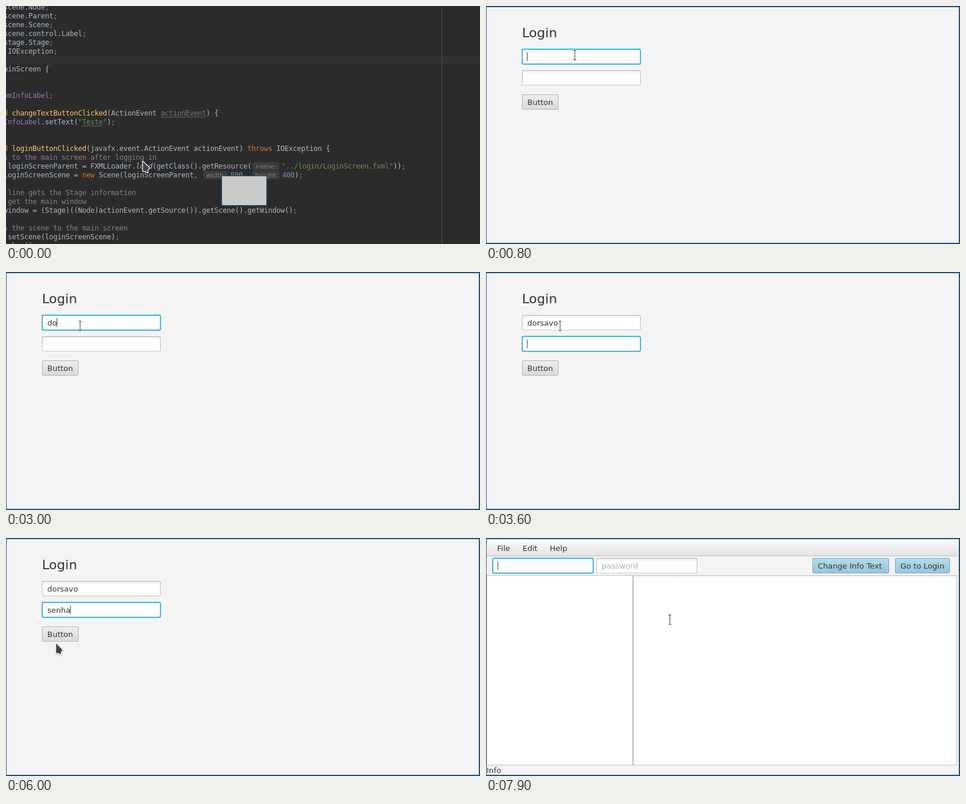
Animation, 803 px wide and 404 px high, one loop 8 s. Source, as an HTML page with a canvas:

```html
<!DOCTYPE html>
<html lang="en">
<head>
<meta charset="utf-8">
<title>Login flow</title>
<style>
html, body { margin: 0; width: 100%; height: 100%; overflow: hidden; background: #f4f4f4; }
canvas { display: block; }
</style>
</head>
<body>
<canvas id="stage" width="803" height="404"></canvas>
<script>
const ctx = document.getElementById('stage').getContext('2d');
const W = 803, H = 404, LOOP = 8000;
const SANS = '"DejaVu Sans", Verdana, sans-serif';
const MONO = '"DejaVu Sans Mono", monospace';
const USER = 'dorsavo', PASS = 'senha';

// ---------- helpers ----------
function rect(x, y, w, h, fill) {
  ctx.fillStyle = fill;
  ctx.fillRect(x, y, w, h);
}

function round(x, y, w, h, r, fill) {
  ctx.fillStyle = fill;
  ctx.beginPath();
  ctx.roundRect(x, y, w, h, r);
  ctx.fill();
}

function text(s, x, y, size = 13, color = '#333') {
  ctx.font = `${size}px ${SANS}`;
  ctx.fillStyle = color;
  ctx.fillText(s, x, y);
}

function fade(y0, y1, ...colors) {
  const g = ctx.createLinearGradient(0, y0, 0, y1);
  colors.forEach((c, i) => g.addColorStop(i / (colors.length - 1), c));
  return g;
}

// Last entry of a [time, ...] list that has begun.
function at(list, t) {
  let hit = list[0];
  for (const e of list) if (e[0] <= t) hit = e;
  return hit;
}

// ---------- code editor ----------
const INK = {
  t: '#a9b7c6', k: '#cc7832', s: '#6a8759', n: '#6897bb',
  m: '#ffc66d', f: '#9876aa', c: '#808080', u: '#72737a', i: '#a9b7c6'
};
const CELL = 7;
// [row, x, ...[ink, text, hint width]]
const ROWS = [
  [0, -4, ['t', 'scene.Node'], ['k', ';']],
  [1, -4, ['t', 'scene.Parent'], ['k', ';']],
  [2, -4, ['t', 'scene.Scene'], ['k', ';']],
  [3, -4, ['t', 'scene.control.Label'], ['k', ';']],
  [4, -4, ['t', 'stage.Stage'], ['k', ';']],
  [5, -4, ['t', '.IOException'], ['k', ';']],
  [7, -4, ['t', 'ainScreen {']],
  [10, -4, ['f', 'omInfoLabel'], ['k', ';']],
  [12, -4, ['k', 'd '], ['m', 'changeTextButtonClicked'], ['t', '(ActionEvent '], ['u', 'actionEvent'], ['t', ') {']],
  [13, -4, ['f', 'InfoLabel'], ['t', '.setText('], ['s', '"Teste"'], ['t', ')'], ['k', ';']],
  [16, -4, ['k', 'd '], ['m', 'loginButtonClicked'], ['t', '(javafx.event.ActionEvent actionEvent) '],
    ['k', 'throws '], ['t', 'IOException {']],
  [17, -4, ['c', 's to the main screen after logging in']],
  [18, 3, ['t', 'loginScreenParent = FXMLLoader.'], ['i', 'load'], ['t', '(getClass().getResource('],
    ['h', 'name:', 51], ['s', '"../login/LoginScreen.fxml"'], ['t', '))'], ['k', ';']],
  [19, -4, ['t', 'loginScreenScene = '], ['k', 'new '], ['t', 'Scene(loginScreenParent'], ['k', ', '],
    ['h', 'width:', 48], ['n', '800'], ['k', ', '], ['h', 'height:', 53], ['n', '400'], ['t', ')'], ['k', ';']],
  [21, 3, ['c', 'line gets the Stage information']],
  [22, 3, ['c', 'get the main window']],
  [23, -4, ['t', 'window = (Stage)((Node)actionEvent.getSource()).getScene().getWindow()'], ['k', ';']],
  [25, -4, ['c', 's the scene to the main screen']],
  [26, -4, ['t', '.setScene(loginScreenScene)'], ['k', ';']],
  [27, -4, ['t', '.show()'], ['k', ';']]
];

function hint(label, x, y, w) {
  round(x + 2, y - 11, w - 6, 14, 4, '#3b3b3b');
  text(label, x + 7, y, 11, '#7c7c7c');
}

function wave(x, y, w, color) {
  ctx.strokeStyle = color;
  ctx.lineWidth = 1;
  ctx.beginPath();
  for (let i = 0; i <= w; i += 2) ctx.lineTo(x + i, y + (i % 4 ? 0 : 2));
  ctx.stroke();
}

function editor() {
  rect(0, 0, W, H, '#2b2b2b');
  rect(0, 84, W, 15, '#323232');
  rect(738, 0, 1, H, '#4d4d4d');
  for (const [row, x0, ...runs] of ROWS) {
    const y = 6 + row * 15;
    let x = x0;
    for (const [ink, s, w] of runs) {
      if (ink === 'h') {
        hint(s, x, y, w);
        x += w;
        continue;
      }
      ctx.font = `${ink === 'i' ? 'italic ' : ''}12px ${MONO}`;
      ctx.fillStyle = INK[ink];
      [...s].forEach((ch, i) => ctx.fillText(ch, x + i * CELL, y));
      x += s.length * CELL;
    }
  }
  wave(262, 187.5, 77, '#72737a');
  wave(129, 202.5, 35, '#5f7a50');
  // window that is just opening
  ctx.globalAlpha = 0.76;
  rect(364.5, 287.5, 78, 52, '#235078');
  ctx.globalAlpha = 1;
  rect(366, 289, 75, 49, '#cacaca');
}

// ---------- controls ----------
function frame(bg) {
  rect(0, 0, W, H, '#235078');
  rect(1, 2, W - 3, H - 4, bg);
}

function focusRing(x, y, w, h, inner) {
  round(x - .2, y - .2, w + .4, h + .4, 3, '#039ed3');
  round(x + 1, y + 1, w - 2, h - 2, 2, inner);
  round(x - 1.4, y - 1.4, w + 2.8, h + 2.8, 4, 'rgba(3,158,211,.133)');
}

function field(x, y, w, focus, value = '', caret = false, prompt = '') {
  const h = 26;
  if (focus) {
    focusRing(x, y, w, h, '#fff');
    round(x + 2, y + 2, w - 4, h - 4, 1, fade(y + 2, y + 6, '#f3f6f7', '#fff'));
  } else {
    round(x, y, w, h, 3, fade(y, y + h, '#b3b3b3', '#c9c9c9'));
    round(x + 1, y + 1, w - 2, h - 2, 2, fade(y + 1, y + 6, '#ececec', '#fff'));
  }
  if (prompt) text(prompt, x + 9, y + 18, 13, '#adadad');
  text(value, x + 9, y + 18);
  if (caret) rect(x + 8.5 + ctx.measureText(value).width, y + 5.5, 1, 15, '#333');
}

function button(label, x, y, w, top, bottom, edge, focus) {
  const h = 26;
  if (focus) focusRing(x, y, w, h, bottom);
  else round(x, y, w, h, 3, edge);
  const d = focus ? 2 : 1;
  round(x + d, y + d, w - 2 * d, h - 2 * d, 2, fade(y, y + h, top, bottom));
  text(label, x + 9, y + 18);
}

// ---------- screens ----------
const USER_TYPED = [[0, 0], [3000, 2], [3200, 4], [3400, 6], [3500, 7]];
const PASS_TYPED = [[0, 0], [4600, 2], [4800, 4], [5000, 5]];
const CARET = [
  [0, 1], [900, 0], [1500, 1], [2000, 0], [2500, 1], [4300, 0],
  [4600, 1], [5400, 0], [5900, 1], [6500, 0]
];

function login(t) {
  frame('#f4f4f4');
  text('Login', 61, 53, 22);
  const caret = at(CARET, t)[1];
  const first = t < 3600, pressed = t >= 6800, second = !first && !pressed;
  field(61, 73, 201, first, USER.slice(0, at(USER_TYPED, t)[1]), first && caret);
  field(61, 109, 201, second, PASS.slice(0, at(PASS_TYPED, t)[1]), second && caret);
  if (pressed) button('Button', 61, 150, 62, '#dedede', '#c8c8c8', '#b5b5b5', true);
  else button('Button', 61, 150, 62, '#eeeeee', '#d9d9d9', '#b5b5b5', false);
}

function mainScreen() {
  frame('#f4f4f4');
  rect(1, 2, 800, 28, fade(2, 30, '#fdfdfd', '#e3e3e3'));
  rect(1, 30, 800, 1, '#c3c3c3');
  text('File', 19, 22);
  text('Edit', 62, 22);
  text('Help', 108, 22);
  field(11, 34, 171, true, '', true);
  field(187, 34, 171, false, '', false, 'password');
  button('Change Info Text', 553, 34, 130, '#b5dcec', '#98c5da', '#7fa6b8');
  button('Go to Login', 693, 34, 93, '#b5dcec', '#98c5da', '#7fa6b8');
  rect(1, 63, 797, 323, '#c3c3c3');
  rect(2, 64, 246, 321, '#fff');
  rect(248, 64, 2, 321, '#bcbcbc');
  rect(250, 64, 547, 321, fade(64, 69, '#ececec', '#fff'));
  text('Info', 1, 399);
}

// ---------- pointer ----------
const ARROW = [[0, 0], [11, 11.3], [8, 14], [8, 19], [4.5, 16.3], [0, 16.3]];
// [time, shape, x, y]
const POINTER = [
  [0, 'a', 232, 264], [600, 'i', 170, 109], [800, 'i', 150, 83], [900, 'i', 124, 115],
  [1100, 'i', 124, 110], [1200, 'i', 124, 104], [1300, 'i', 125, 98], [1400, 'i', 125, 93],
  [1500, 'i', 125, 91], [5700, 'a', 108, 186], [5800, 'a', 80, 241], [5900, 'a', 74, 212],
  [6000, 'a', 85, 179], [6200, 'a', 92, 165], [6300, 'a', 99, 155],
  [7600, 'a', 130, 159], [7700, 'a', 200, 160], [7800, 'i', 275, 150], [7900, 'i', 311, 138]
];

function arrow(x, y) {
  ctx.save();
  ctx.beginPath();
  for (const [dx, dy] of ARROW) ctx.lineTo(x + dx, y + dy);
  ctx.closePath();
  ctx.lineJoin = 'round';
  ctx.lineWidth = 2.4;
  ctx.strokeStyle = '#fff';
  ctx.shadowColor = 'rgba(0,0,0,.3)';
  ctx.shadowBlur = 2;
  ctx.shadowOffsetY = 1;
  ctx.stroke();
  ctx.shadowColor = 'transparent';
  ctx.fillStyle = '#434343';
  ctx.fill();
  ctx.restore();
}

function beam(x, y) {
  rect(x - 1, y - 8, 3, 17, 'rgba(255,255,255,.8)');
  rect(x, y - 8, 1, 17, '#444');
  rect(x - 2, y - 8, 5, 1, '#444');
  rect(x - 2, y + 8, 5, 1, '#444');
}

// ---------- loop ----------
function draw(t) {
  if (t < 100) editor();
  else if (t < 300) frame('#fff');
  else if (t < 7200) login(t);
  else mainScreen();
  const [, shape, x, y] = at(POINTER, t);
  (shape === 'a' ? arrow : beam)(x, y);
}

const start = performance.now();
function tick() {
  draw((performance.now() - start) % LOOP);
  requestAnimationFrame(tick);
}
tick();
</script>
</body>
</html>
```
